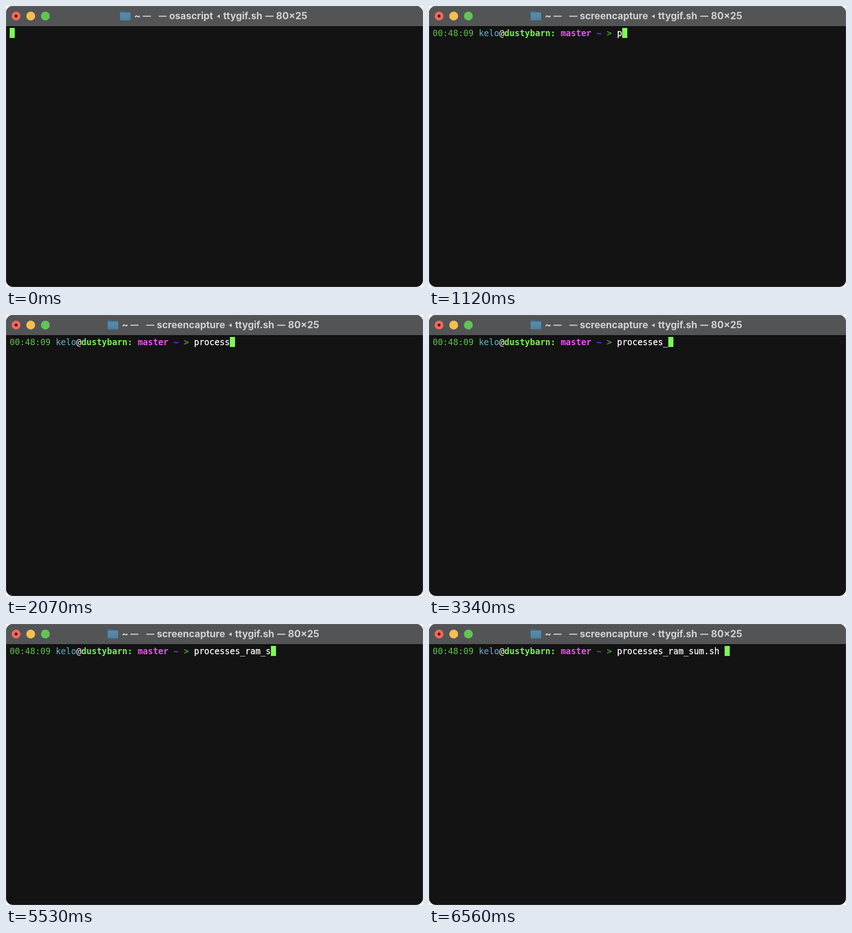
Write an HTML page that moves like this. It is 911 px wide and 615 px high and loops after 8000 ms.

```html
<!DOCTYPE html>
<html lang="en">
<head>
<meta charset="utf-8">
<title>Terminal</title>
<style>
  html, body { margin: 0; width: 100%; height: 100%; overflow: hidden; background: #fff; }
  svg { display: block; width: 911px; height: 615px; }
  .bar { font: 700 20.95px Inter, sans-serif; fill: #d2d2d3; }
  .line { font: 18.59px "DejaVu Sans Mono", monospace; fill: #fff; white-space: pre; }
  .bold { font-weight: 700; }
  .green { fill: #5fbf46; }
  #typed { stroke: #fff; stroke-width: .3px; }
</style>
</head>
<body>
<svg viewBox="0 0 911 615">
  <defs>
    <clipPath id="frame"><rect width="911" height="615" rx="15"/></clipPath>
    <linearGradient id="blue" x2="0" y2="1">
      <stop stop-color="#5b8cab"/><stop offset="1" stop-color="#4d7fa1"/>
    </linearGradient>
  </defs>
  <g clip-path="url(#frame)">
    <rect width="911" height="615" fill="#131313"/>
    <rect width="911" height="44.5" fill="#535456"/>
    <rect y="44.5" width="911" height="1" fill="#000"/>
  </g>
  <rect x=".5" y=".5" width="910" height="614" rx="14.5" fill="none" stroke="#8a8a8a" stroke-opacity=".35"/>
  <circle cx="22" cy="22" r="9.7" fill="#ed6a5e"/>
  <circle cx="22" cy="22" r="3.2" fill="#6a120c"/>
  <circle cx="54" cy="22" r="9.7" fill="#f5bf4f"/>
  <circle cx="86" cy="22" r="9.7" fill="#61c554"/>

  <g class="bar">
    <g id="left">
      <path d="M249 12.5q0-2 2-2h6l2 2h11q2 0 2 2v15q0 2-2 2h-19q-2 0-2-2z" fill="#3f6b88"/>
      <rect x="249" y="14.5" width="23" height="17" rx="1.5" fill="url(#blue)"/>
      <text x="280" y="28.7">~</text>
      <path d="M299 21.2h17.5v2.4h-17.5zM333.5 21.2h17.5v2.4h-17.5z"/>
      <text id="job" x="356.5" y="28.7"></text>
    </g>
    <g id="right">
      <path d="M460.5 22.5l6.5-4v8z"/>
      <text x="474.4" y="28.7">ttygif.sh</text>
      <path d="M566.5 21.2h17.5v2.4h-17.5z"/>
      <text x="590" y="28.7">80×25</text>
    </g>
  </g>

  <text class="line" id="line" x="8" y="66" xml:space="preserve"><tspan class="green">00:48:09 </tspan><tspan fill="#62b5cb">kelo</tspan>@<tspan class="bold" fill="#78ee4e">dustybarn: </tspan><tspan class="bold" fill="#ee4ff3">master </tspan><tspan class="bold" fill="#5a3df2">~ </tspan><tspan class="green">&gt; </tspan><tspan id="typed"></tspan></text>
  <rect id="cursor" y="48" width="11.2" height="22" fill="#7dfb55"/>
</svg>
<script>
  const LOOP = 8000, CELL = 11.19, LEFT = 8, PROMPT_COLS = 36;
  const TITLE_AT = 210, PROMPT_AT = 430;
  const $ = id => document.getElementById(id);

  // [time, key]: "<" erases one character, other keys append
  const keys = [
    [1120, "p"], [1270, "r"], [1460, "o"], [1650, "c"], [1740, "e"], [1910, "s"], [2070, "s"],
    [2930, "e"], [3070, "s"], [3340, "_"], [3990, "r"], [4070, "a"], [4970, "m"], [5210, "_"],
    [5530, "s"], [5600, "u"], [5850, "n"], [6250, "<"], [6440, "m"], [6560, ".sh "]
  ];

  function typedAt(t) {
    return keys.filter(([at]) => at <= t)
      .reduce((text, [, key]) => key === "<" ? text.slice(0, -1) : text + key, "");
  }

  function draw(now) {
    const t = now % LOOP;
    const capturing = t >= TITLE_AT, ready = t >= PROMPT_AT;
    const typed = typedAt(t);
    $("job").textContent = capturing ? "screencapture" : "osascript";
    $("left").setAttribute("transform", `translate(${capturing ? -27 : 0})`);
    $("right").setAttribute("transform", `translate(${capturing ? 26 : 0})`);
    $("line").style.display = ready ? "" : "none";
    $("typed").textContent = typed;
    $("cursor").setAttribute("x", LEFT + (ready ? PROMPT_COLS + typed.length : 0) * CELL);
  }

  const start = performance.now();
  function tick() {
    draw(performance.now() - start);
    requestAnimationFrame(tick);
  }
  tick();
</script>
</body>
</html>
```
